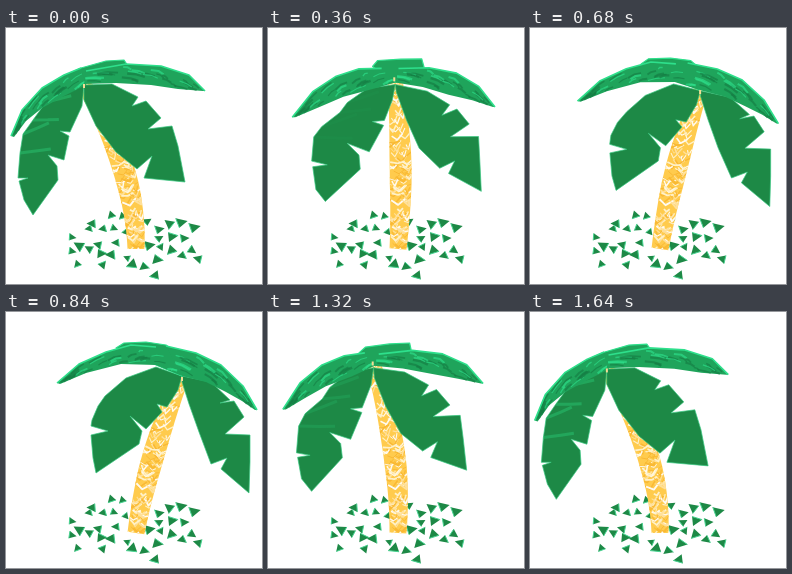
An HTML page with a canvas that plays this animation: 256 px wide and 256 px high, repeating every 1.68 s.

```html
<!DOCTYPE html>
<html lang="en">
<head>
<meta charset="utf-8">
<title>Swaying palm</title>
<style>
html, body { margin: 0; width: 100%; height: 100%; overflow: hidden; background: #fff; }
canvas { display: block; width: 100vw; height: 100vh; }
</style>
</head>
<body>
<canvas id="stage" width="256" height="256"></canvas>
<script>
const ctx = document.getElementById('stage').getContext('2d');
const LOOP = 1680, STEP = 40;
const DARK = '#1d8946', MID = '#1fa45b', LIGHT = '#2ee08c', SHADE = '#167c43';

// Time step and lean: 0 is far left, 1 far right.
const SWAY = [[0, 0], [5, .265], [13, .735], [18, .98], [21, 1], [28, .56], [33, .28], [40, .01]];

// Each row is one corner: x, y leaning left, upright, leaning right.
const LEFT_LEAF = [
  [78, 57, 133, 57, 176, 64], [60, 58, 105, 60, 150, 55], [40, 74, 84, 74, 120, 66],
  [27, 92, 76, 84, 99, 84], [17, 106, 58, 98, 92, 94], [14, 125, 50, 108, 86, 108],
  [12, 150, 48, 131, 85, 114], [22, 150, 64, 135, 102, 119], [13, 153, 49, 137, 85, 123],
  [18, 172, 52, 160, 87, 146], [27, 187, 61, 172, 90, 161], [52, 152, 97, 140, 133, 132],
  [51, 138, 96, 126, 136, 119], [42, 127, 84, 114, 124, 104], [58, 132, 106, 123, 140, 117],
  [63, 108, 121, 97, 156, 100], [54, 103, 110, 93, 151, 92], [64, 104, 122, 92, 161, 95],
  [76, 78, 130, 72, 172, 78]
];
const RIGHT_LEAF = [
  [78, 57, 133, 57, 176, 64], [106, 56, 165, 64, 205, 70], [132, 69, 187, 78, 224, 88],
  [126, 78, 179, 88, 214, 91], [140, 73, 194, 82, 228, 89], [155, 90, 206, 97, 238, 105],
  [142, 101, 187, 110, 219, 122], [166, 98, 215, 110, 244, 123], [172, 118, 216, 135, 244, 150],
  [179, 154, 217, 165, 243, 181], [138, 150, 185, 146, 215, 157], [146, 128, 191, 134, 221, 146],
  [131, 141, 176, 141, 205, 152], [110, 124, 156, 120, 193, 120], [90, 98, 144, 92, 183, 92],
  [78, 72, 134, 64, 176, 70]
];
const BACK_LEAF = [
  [64, 45, 107, 38, 110, 36], [75, 40, 112, 32, 118, 31], [100, 33, 135, 31, 140, 30],
  [118, 32, 156, 31, 160, 33], [122, 38, 159, 40, 172, 42], [100, 50, 145, 50, 180, 55],
  [78, 55, 133, 55, 176, 64]
];
// Drooping fronds: upper and lower edge from crown to tip.
const LEFT_FROND = {
  upper: [[75, 40, 118, 40, 150, 35], [58, 47, 95, 40, 125, 33], [36, 60, 72, 47, 100, 40],
    [16, 82, 48, 62, 73, 52], [5, 108, 27, 87, 51, 71]],
  lower: [[80, 57, 133, 55, 176, 64], [58, 68, 110, 60, 150, 53], [36, 80, 80, 67, 115, 52],
    [20, 93, 55, 77, 80, 61], [8, 109, 30, 87, 54, 72]]
};
const RIGHT_FROND = {
  upper: [[80, 43, 135, 40, 160, 34], [120, 36, 165, 40, 190, 41], [155, 38, 192, 46, 215, 53],
    [183, 47, 214, 60, 237, 74], [199, 63, 230, 81, 251, 98]],
  lower: [[78, 56, 133, 55, 176, 64], [110, 55, 160, 60, 200, 70], [145, 57, 185, 68, 220, 80],
    [172, 61, 208, 74, 236, 89], [197, 63, 228, 81, 249, 98]]
};
const SHARDS = [
  [105, 187], [86, 196], [66, 209], [73, 218], [97, 201], [108, 200], [92, 217], [83, 221],
  [97, 237], [71, 236], [66, 223], [110, 215], [105, 227], [121, 230], [126, 236], [138, 239],
  [149, 247], [151, 232], [155, 219], [143, 217], [153, 201], [141, 193], [163, 196], [175, 194],
  [188, 199], [166, 209], [178, 210], [186, 222], [176, 228], [165, 222], [192, 231], [116, 188],
  [83, 201], [95, 226], [153, 210], [120, 204]
];

const mix = (a, b, k) => a + (b - a) * k;

function randomizer(seed) {
  return () => (seed = (seed * 16807) % 2147483647) / 2147483647;
}

// Periodic cubic through the sway keys.
function leanAt(step) {
  const n = SWAY.length;
  const key = i => {
    const turn = Math.floor(i / n), [t, v] = SWAY[i - turn * n];
    return [t + turn * LOOP / STEP, v];
  };
  let i = n - 1;
  while (SWAY[i][0] > step) i--;
  const slope = j => {
    const a = key(j - 1), b = key(j + 1);
    return (b[1] - a[1]) / (b[0] - a[0]);
  };
  const [t0, v0] = key(i), [t1, v1] = key(i + 1), d = t1 - t0, u = (step - t0) / d;
  return v0 + d * slope(i) * u + (3 * (v1 - v0) - d * (2 * slope(i) + slope(i + 1))) * u * u
    + (2 * (v0 - v1) + d * (slope(i) + slope(i + 1))) * u ** 3;
}

// Quadratic blend of the three leaning poses.
function pose(points, p) {
  const m = .56;
  const a = (p - m) * (p - 1) / m, b = p * (p - 1) / (m * (m - 1)), c = p * (p - m) / (1 - m);
  return points.map(q => [0, 1].map(k => a * q[k] + b * q[k + 2] + c * q[k + 4]));
}

function trace(points) {
  ctx.beginPath();
  points.forEach(([x, y]) => ctx.lineTo(x, y));
}

function shape(points, fill, edge, width = 1) {
  trace(points);
  ctx.closePath();
  ctx.fillStyle = fill;
  ctx.fill();
  if (edge) {
    ctx.strokeStyle = edge;
    ctx.lineWidth = width;
    ctx.stroke();
  }
}

function along(points, u) {
  const f = Math.min(Math.max(u, 0), .9999) * (points.length - 1), i = Math.floor(f);
  return [0, 1].map(k => mix(points[i][k], points[i + 1][k], f - i));
}

function frond(edges, p, seed) {
  const upper = pose(edges.upper, p), lower = pose(edges.lower, p), rnd = randomizer(seed);
  const at = (u, v) => {
    const a = along(upper, u), b = along(lower, u);
    return [mix(a[0], b[0], v), mix(a[1], b[1], v)];
  };
  shape([...upper, ...lower.slice().reverse()], MID);
  for (let i = 0; i < 26; i++) {
    const u = rnd() * .88, v = .12 + rnd() * .72, len = .05 + rnd() * .1;
    trace([at(u, v), at(u + len / 2, v + .02), at(u + len, v + .12)]);
    ctx.strokeStyle = i % 3 ? SHADE : LIGHT;
    ctx.lineWidth = 1 + rnd() * 1.4;
    ctx.globalAlpha = .65;
    ctx.stroke();
  }
  ctx.globalAlpha = 1;
  trace(upper);
  ctx.strokeStyle = LIGHT;
  ctx.lineWidth = 1.6;
  ctx.stroke();
}

function trunk(p) {
  const [top] = pose([[78, 57, 133, 54, 176, 65]], p), bend = 130 + 13 * p;
  const point = t => [
    (1 - t) ** 2 * 130 + 2 * t * (1 - t) * bend + t * t * top[0],
    (1 - t) ** 2 * 221 + 2 * t * (1 - t) * 140 + t * t * top[1]
  ];
  const half = t => t < .4 ? 8.5 + 6 * t : 10.9 - 10 * Math.max(0, t - .55) ** 1.3;
  const at = (t, side) => {
    const a = point(t - .01), b = point(t + .01), d = Math.hypot(b[0] - a[0], b[1] - a[1]);
    const [x, y] = point(t), w = half(t) * side / d;
    return [x - (b[1] - a[1]) * w, y + (b[0] - a[0]) * w];
  };
  const left = [], right = [];
  for (let t = 0; t <= 1.001; t += .04) {
    left.push(at(t, 1));
    right.unshift(at(t, -1));
  }
  ctx.save();
  shape([...left, ...right], '#ffcb4d');
  ctx.clip();
  const rnd = randomizer(731);
  for (let i = 0; i < 130; i++) {
    const t = rnd(), side = rnd() * 2 - 1, len = .2 + rnd() * .5, rise = .008 + rnd() * .025;
    trace([at(t, side - len), at(t - rise, side), at(t + rise * .4, side + len)]);
    ctx.strokeStyle = ['#fff1c8', '#ffe09a', '#f9b934', '#fffaf0'][i % 4];
    ctx.lineWidth = .8 + rnd() * 1.1;
    ctx.stroke();
  }
  ctx.restore();
}

function ground() {
  const rnd = randomizer(4207);
  for (const [x, y] of SHARDS) {
    const turn = rnd() * 6.28, size = 4.2 + rnd() * 2.6;
    const corners = [0, 2, 4.3].map(a => [
      x + Math.cos(turn + a) * size, y + Math.sin(turn + a) * size * .9
    ]);
    shape(corners, DARK);
    trace(corners.slice(0, 2));
    ctx.strokeStyle = '#48d391';
    ctx.lineWidth = 1;
    ctx.stroke();
  }
}

function gloss(leaf, p) {
  ctx.save();
  trace(leaf);
  ctx.clip();
  ctx.globalAlpha = .6 * Math.max(0, 1 - p * 1.8);
  ctx.strokeStyle = '#27b969';
  ctx.lineWidth = 3;
  for (const [from, to] of [[2, 18], [3, 17], [4, 16], [5, 14]]) {
    const a = leaf[from], b = leaf[to];
    trace([a, [mix(a[0], b[0], .4), mix(a[1], b[1], .4) - 5], [mix(a[0], b[0], .7), mix(a[1], b[1], .7) - 9]]);
    ctx.stroke();
  }
  ctx.restore();
}

function draw(time) {
  const p = leanAt(Math.floor((time % LOOP) / STEP));
  ctx.fillStyle = '#fff';
  ctx.fillRect(0, 0, 256, 256);
  ctx.lineJoin = 'round';
  ground();
  trunk(p);
  const left = pose(LEFT_LEAF, p);
  shape(left, DARK, '#39c982', .7);
  gloss(left, p);
  shape(pose(RIGHT_LEAF, p), DARK, '#39c982', .7);
  shape(pose(BACK_LEAF, p), MID, LIGHT, 1.2);
  frond(LEFT_FROND, p, 91);
  frond(RIGHT_FROND, p, 377);
  const [crown] = pose([[78, 57, 132, 51, 176, 66]], p);
  ctx.fillStyle = '#f3dc95';
  ctx.fillRect(crown[0] - 1, crown[1] - 1, 2, 4);
}

const start = performance.now();
function tick() {
  draw(performance.now() - start);
  requestAnimationFrame(tick);
}
tick();
</script>
</body>
</html>
```
